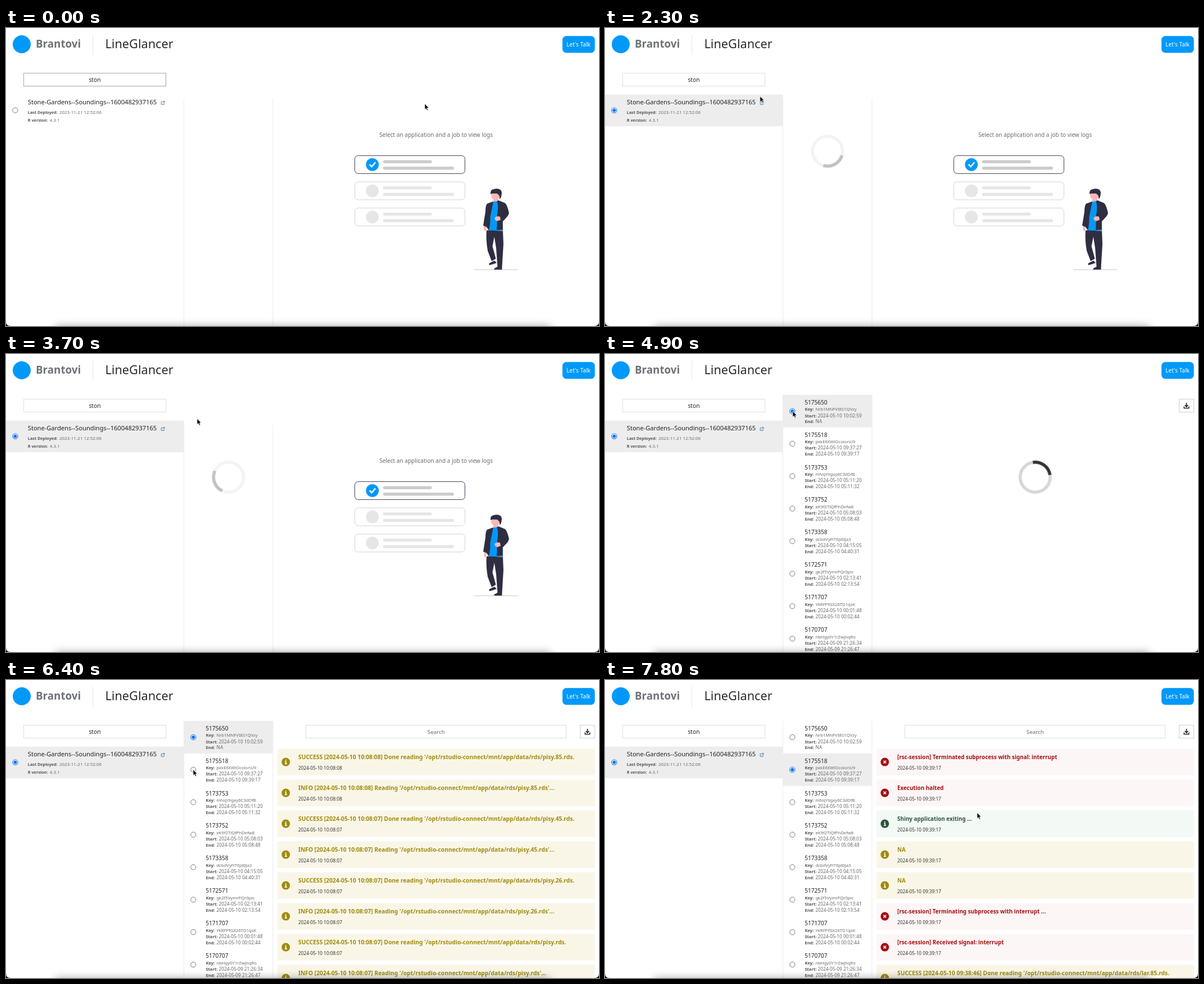
Recreate the animation shown at these times as an HTML page. Size 1055x531 px, loop 8500 ms.

```html
<!DOCTYPE html>
<html lang="en">
<head>
<meta charset="utf-8">
<title>LineGlancer</title>
<style>
html, body { margin: 0; width: 100%; height: 100%; overflow: hidden; background: #fff; }
.stage { position: relative; width: 100%; height: 100%; overflow: hidden; contain: strict; }
svg { position: absolute; left: 0; top: 0; width: 1055px; height: 531px; }
text { font-family: "Noto Sans", "Open Sans", sans-serif; white-space: pre; }
.b { font-weight: 700; }
.m { text-anchor: middle; }
.step { animation: 8.5s step-end infinite; }
.shadow {
  position: absolute; left: 88px; top: 532px; width: 880px; height: 20px;
  box-shadow: 0 0 16px rgba(0, 0, 0, .38);
}

#field { animation-name: field; }
#appOn { animation-name: appOn; }
#art { animation-name: art; }
#jobs { animation-name: jobs; }
#pick { animation-name: pick; }
#save { animation-name: save; }
#find { animation-name: find; }
#logsA { animation-name: logsA; }
#logsB { animation-name: logsB; }
#waitJobs { animation: waitJobs 8.5s linear infinite; }
#waitLogs { animation: waitLogs 8.5s linear infinite; }
.arc { animation: turn 8.5s linear infinite; }
#cursor { animation: move 8.5s ease-in-out infinite; }
#arrow { animation-name: arrow; }
#beam { animation-name: beam; }

@keyframes field { 0% { stroke: #a6a6a6; } 17.6%, 100% { stroke: #dedede; } }
@keyframes appOn { 0% { opacity: 0; } 17.6%, 100% { opacity: 1; } }
@keyframes art { 0% { opacity: 1; } 52.9%, 100% { opacity: 0; } }
@keyframes jobs { 0% { opacity: 0; } 45.8%, 100% { opacity: 1; } }
@keyframes save { 0% { opacity: 0; } 52.9%, 100% { opacity: 1; } }
@keyframes pick {
  0% { opacity: 0; transform: none; }
  52.9% { opacity: 1; transform: none; }
  77.6%, 100% { opacity: 1; transform: translateY(57.9px); }
}
@keyframes find { 0% { opacity: 0; } 59.95% { opacity: 1; } 78.8% { opacity: 0; } 84.6%, 100% { opacity: 1; } }
@keyframes logsA { 0% { opacity: 0; } 59.95% { opacity: 1; } 78.8%, 100% { opacity: 0; } }
@keyframes logsB { 0% { opacity: 0; } 84.6%, 100% { opacity: 1; } }
@keyframes waitJobs {
  0% { opacity: 0; animation-timing-function: step-end; }
  18.4% { opacity: 1; }
  24.3% { opacity: 1; animation-timing-function: ease; }
  27.3% { opacity: .3; animation-timing-function: step-end; }
  45.8%, 100% { opacity: 0; }
}
@keyframes waitLogs {
  0% { opacity: 0; animation-timing-function: step-end; }
  52.9% { opacity: 1; }
  59% { opacity: 1; }
  59.94% { opacity: .75; animation-timing-function: step-end; }
  59.95% { opacity: 0; animation-timing-function: step-end; }
  78.8% { opacity: 1; animation-timing-function: step-end; }
  84.6%, 100% { opacity: 0; }
}
/* one turn per 1.1 s */
@keyframes turn {
  from { transform: rotate(var(--a)); }
  to { transform: rotate(calc(var(--a) + 2781.818deg)); }
}
@keyframes move {
  0%, 2.4% { transform: translate(745px, 135px); }
  11.8%, 21.5% { transform: translate(168px, 132px); }
  31.2%, 43.5% { transform: translate(340px, 115.3px); }
  51%, 68.2% { transform: translate(334px, 102px); }
  74.5%, 78.2% { transform: translate(333px, 159.7px); }
  82%, 100% { transform: translate(662px, 236.5px); }
}
@keyframes arrow { 0% { opacity: 1; } 9% { opacity: 0; } 25.9%, 100% { opacity: 1; } }
@keyframes beam { 0% { opacity: 0; } 9% { opacity: 1; } 25.9%, 100% { opacity: 0; } }
</style>
</head>
<body>
<div class="stage">
<svg viewBox="0 0 1055 531">
  <defs>
    <g id="off"><circle r="4.6" fill="#fff" stroke="#767676"/></g>
    <g id="on"><circle r="4.6" fill="#fff" stroke="#0070f0" stroke-width="1.1"/><circle r="2.9" fill="#0070f0"/></g>
  </defs>

  <!-- header -->
  <circle cx="28" cy="29" r="16" fill="#0099f9"/>
  <text class="b" x="53" y="35" font-size="18.8" fill="#6f7378">Brantovi</text>
  <path d="M154.5 12V48" stroke="#e6e6e6"/>
  <text x="176.5" y="36" font-size="21.7" fill="#2b2b2b">LineGlancer</text>
  <rect x="990" y="14.3" width="57.6" height="29.9" rx="7" fill="#0099f9"/>
  <text class="m" x="1018.6" y="33.2" font-size="10.1" fill="#fff">Let's Talk</text>

  <!-- applications -->
  <rect id="field" class="step" x="31.5" y="80.5" width="253" height="23" fill="#fff"/>
  <text class="m" x="158" y="95.8" font-size="10.2" fill="#222">ston</text>
  <path d="M316.5 126V531M475 126V531" stroke="#ebebeb"/>
  <use href="#off" x="16.4" y="146.6"/>
  <g id="appOn" class="step">
    <rect y="118.7" width="316.5" height="56.3" fill="#ededed"/>
    <use href="#on" x="16.4" y="146.6"/>
  </g>
  <g id="app"></g>
  <path d="M278.5 131.3H276.2V136.3H281.2V134M279.2 130.5H282V133.3M282 130.5L278.6 133.9" fill="none" stroke="#3f78a8" stroke-width=".9"/>

  <!-- empty state -->
  <g id="art" class="step">
    <text class="m" x="765.2" y="194" font-size="10.05" fill="#6a6a6a">Select an application and a job to view logs</text>
    <g id="cards"></g>
    <path d="M646.8 243.2L650.6 247.2L657.2 239.4" fill="none" stroke="#fff" stroke-width="2.5"/>
    <path d="M833 430.8H911" stroke="#c8c8c8"/>
    <g fill="#ffb6b6">
      <ellipse cx="870.5" cy="298" rx="7.4" ry="8"/>
      <path d="M867 302H876V311H867ZM850 351L855 352L854.5 360Q852 364.5 850.5 360Z"/>
    </g>
    <path d="M865 310L876 308L884 325V361H859L861 330Z" fill="#0099f9"/>
    <g fill="#2f2e41">
      <path d="M862 296Q861 288 868 287.3Q874 284.5 880 288.5Q883 292 881.5 298Q881 303 878 304.5Q878.5 298 875.5 296.5Q874 294 870 295Q866 294 862 296Z"/>
      <path d="M867 309L856 313Q853 316 853 327L849 352L855 354.5L859 361Q862 348 861.5 336Z"/>
      <path d="M876 307L888 312Q892 316 894.8 329Q895 333 890 338L883.5 345L884 359L873 360Q874 345 873.5 335Q877 318 873.5 309Z"/>
      <path d="M855 360.5L884 361.5L885 385L882.5 426H874.5L872 392L868.8 372L865.5 389L871.5 411L864 415.5L857 397Q853.5 377 855 360.5Z"/>
      <path d="M860 419L869 414.5L873 418.5L866 421L860 422.5Q858.5 421 860 419ZM868.5 428.5L875 425L882.5 425.5V430.5H868.5Z"/>
    </g>
    <path d="M869.5 338Q874 334 879 336.5L880 342L874 344Q869 343 869.5 338Z" fill="#ffb6b6"/>
  </g>

  <!-- jobs -->
  <g id="jobs" class="step">
    <path d="M316.5 73V126M475 73V126" stroke="#ebebeb"/>
    <g id="radios"></g>
    <g id="pick" class="step">
      <rect x="317" y="72.8" width="158" height="57.9" fill="#ededed"/>
      <use href="#on" x="333.3" y="101.9"/>
    </g>
    <g id="jobText"></g>
  </g>

  <!-- logs -->
  <g id="save" class="step">
    <rect x="1021.5" y="80.5" width="26" height="23" fill="#fff" stroke="#d0d0d0"/>
    <path d="M1034.5 87V93.5M1031.6 91L1034.5 94L1037.4 91" fill="none" stroke="#222" stroke-width="1.7"/>
    <path d="M1030.2 93.6V96.4H1038.8V93.6" fill="none" stroke="#222" stroke-width="1.5"/>
  </g>
  <g id="find" class="step">
    <rect x="533.5" y="80.5" width="463" height="23" fill="#fff" stroke="#dedede"/>
    <text class="m" x="765.3" y="95.8" font-size="9.8" fill="#6a6a6a">Search</text>
  </g>
  <g id="logsA" class="step"></g>
  <g id="logsB" class="step"></g>

  <g id="waitJobs"></g>
  <g id="waitLogs"></g>
</svg>
<div class="shadow"></div>
<svg viewBox="0 0 1055 531">
  <path d="M0 523Q0 531 8 531H0ZM1055 523Q1055 531 1047 531H1055Z"/>
  <g id="cursor">
    <path id="arrow" class="step" d="M0 0V10.2L2.3 8.2L4 11.9L5.7 11.1L4.1 7.5L7.2 7.2Z" stroke="#fff" stroke-width=".7"/>
    <path id="beam" class="step" d="M-2.3 -5.3Q0 -5.3 0 -4Q0 -5.3 2.3 -5.3M0 -4V4M-2.3 5.3Q0 5.3 0 4Q0 5.3 2.3 5.3M-1.4 1.2H1.4" fill="none" stroke="#111"/>
  </g>
</svg>
</div>
<script>
const put = (id, html) => { document.getElementById(id).innerHTML = html; };
const text = (x, y, size, fill, s, cls = '') =>
  `<text class="${cls}" x="${x}" y="${y}" font-size="${size}" fill="${fill}">${s}</text>`;
const use = (id, x, y) => `<use href="#${id}" x="${x}" y="${y}"/>`;

put('app',
  text(38.8, 136, 11.1, '#222', 'Stone-Gardens--Soundings--1600482937165') +
  text(38.8, 152.7, 7.25, '#555', 'Last Deployed:', 'b') +
  text(95, 152.7, 7.95, '#6a6a6a', '2023-11-21 12:52:06') +
  text(38.8, 167.4, 7.25, '#555', 'R version:', 'b') +
  text(77.8, 167.4, 7.95, '#6a6a6a', '4.3.1'));

put('cards', [0, 1, 2].map(i => {
  const y = 227.4 + i * 46.7;
  const bar = (dy, w) => `<path d="M673.5 ${y + dy}h${w}" stroke="${i ? '#e6e6e6' : '#ccc'}" stroke-width="5.4" stroke-linecap="round"/>`;
  return `<rect x="620.5" y="${y}" width="196" height="32" rx="6" fill="#fff" stroke="${i ? '#d2d2d2' : '#3f3d56'}"/>` +
    `<circle cx="651.8" cy="${y + 16}" r="11.4" fill="${i ? '#e6e6e6' : '#0099f9'}"/>` + bar(10.8, 81.5) + bar(22.4, 120.8);
}).join(''));

const jobs = [
  ['5175650', 'Nrb1MNFVI8S1QVzy', '10 10:02:59', ''],
  ['5175518', 'pxkE6XWlOcolonU9', '10 09:37:27', '10 09:39:17'],
  ['5173753', 'mNqYligxy6C3dDfB', '10 05:11:20', '10 05:11:32'],
  ['5173752', 'eK9f2TlQfPhDefw8', '10 05:08:03', '10 05:08:48'],
  ['5173358', 'dcbdVyFlT6jd0Ja3', '10 04:15:05', '10 04:40:31'],
  ['5172571', 'gk2f5VymrPQr0pic', '10 02:13:41', '10 02:13:54'],
  ['5171707', 'YkRFPfGX26TD1qsK', '10 00:01:48', '10 00:02:44'],
  ['5170707', 'nbHgy0Y1rZwJnqRo', '09 21:26:34', '09 21:26:47']
];
put('radios', jobs.map((_, i) => use('off', 333.3, 101.9 + i * 57.9)).join(''));
put('jobText', jobs.map(([id, key, start, end], i) => {
  const y = 89.7 + i * 57.9;
  const pair = (dy, label, x, size, value) =>
    text(355.4, y + dy, 7.6, '#555', label, 'b') + text(x, y + dy, size, '#6a6a6a', value);
  return text(355.2, y, 10.1, '#222', id) +
    pair(11.7, 'Key:', 374.4, 7.7, key) +
    pair(22.8, 'Start:', 378.6, 8.28, '2024-05-' + start) +
    pair(33.7, 'End:', 374.6, 8.28, end ? '2024-05-' + end : 'NA');
}).join(''));

const tones = {
  warn: ['#faf6e7', '#9f8b10'],
  bad: ['#fdf6f6', '#a30f12'],
  good: ['#f3f9f5', '#2b573d']
};
function logRow([tone, title, time], i) {
  const [back, ink] = tones[tone];
  const y = 122.4 + i * 55;
  const mark = tone === 'bad'
    ? 'M-2.3 -2.3L2.3 2.3M2.3 -2.3L-2.3 2.3'
    : 'M-1.5 -.9H.3V3.2M-2 3.2H2.2M-.9 -3.3H.9';
  return `<rect x="483" y="${y}" width="565" height="47.4" fill="${back}"/>` +
    `<g transform="translate(497.8 ${y + 23.7})"><circle r="7.5" fill="${ink}"/>` +
    `<path d="${mark}" fill="none" stroke="#fff" stroke-width="1.6"/></g>` +
    text(520, y + 18.4, title.includes('/') ? 10.25 : 9.85, ink, title, 'b') +
    text(520, y + 37.6, 8.25, '#333', '2024-05-10 ' + time);
}
const path = f => `'/opt/rstudio-connect/mnt/app/data/rds/${f}.rds`;
const done = (f, t) => ['warn', `SUCCESS [2024-05-10 ${t}] Done reading ${path(f)}.`, t];
const read = (f, t) => ['warn', `INFO [2024-05-10 ${t}] Reading ${path(f)}'...`, t];

put('logsA', ['pisy.85', 'pisy.45', 'pisy.26', 'pisy'].flatMap((f, i) => {
  const t = i ? '10:08:07' : '10:08:08';
  return [done(f, t), read(f, t)];
}).map(logRow).join(''));

const halt = '09:39:17';
put('logsB', [
  ['bad', '[rsc-session] Terminated subprocess with signal: interrupt', halt],
  ['bad', 'Execution halted', halt],
  ['good', 'Shiny application exiting ...', halt],
  ['warn', 'NA', halt],
  ['warn', 'NA', halt],
  ['bad', '[rsc-session] Terminating subprocess with interrupt ...', halt],
  ['bad', '[rsc-session] Received signal: interrupt', halt],
  done('lar.85', '09:38:46')
].map(logRow).join(''));

const spinner = (x, a) => `<g transform="translate(${x} 219.5)" fill="none" stroke="#333" stroke-width="5.6">
  <circle r="26.7" stroke="#d6d6d6"/>
  <g class="arc" style="--a:${a}deg"><circle r="26.7" pathLength="4" stroke-dasharray="1 3" transform="rotate(-135)"/></g></g>`;
put('waitJobs', spinner(395.9, -241.6));
put('waitLogs', spinner(765.3, -127.8));
</script>
</body>
</html>
```
